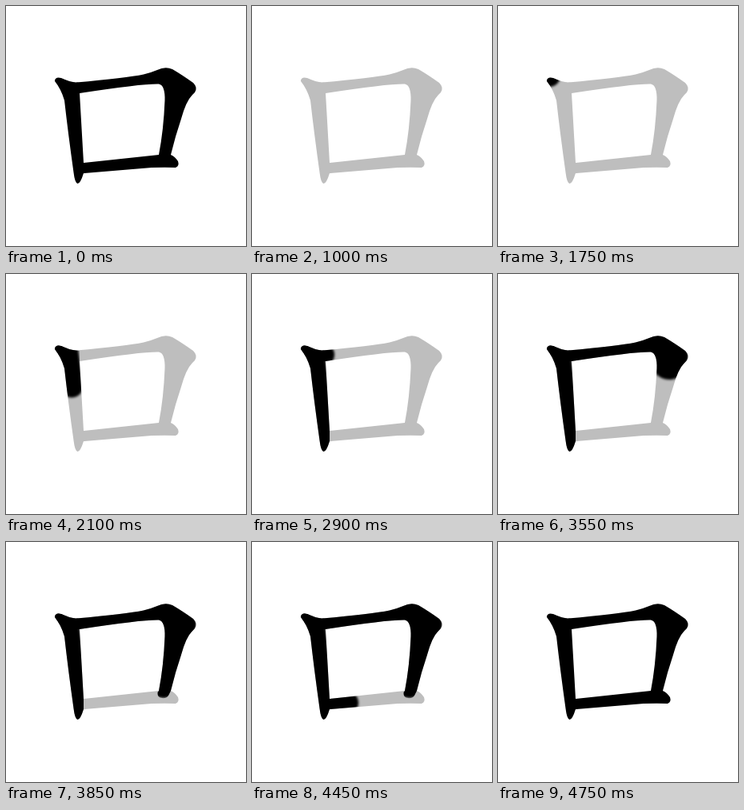
Recreate the animation shown at these times as an HTML page with a canvas. Size 300x300 px, loop 5.75 s.

```html
<!DOCTYPE html>
<html lang="en">
<head>
<meta charset="utf-8">
<title>Stroke order</title>
<style>
html, body { margin: 0; width: 100%; height: 100%; overflow: hidden; background: #fff; }
canvas { display: block; }
</style>
</head>
<body>
<canvas id="stage" width="300" height="300"></canvas>
<script>
const LOOP = 5750, STEP = 100, SHOW_GRAY = 1000, SHOW_FULL = 4750;
const ctx = document.getElementById('stage').getContext('2d');

const left = new Path2D('M61 93Q62 88 69 90Q80 95 88 95.5L92 96V109L97 196V209Q93 222 89.5 222Q86 221 84.5 208Q77.5 158 73 118Q69 104 61 94Z');
const corner = new Path2D('M88 95.5Q150 90 172 85.5Q182 83 189 80Q199 75 208 79Q220 86 234 96Q240 102 236 108L233 111Q225 119 219 141Q211.5 163 206 186L203 192Q200 196 195 195Q189 195 189.5 188L191 186Q197 155 198.5 118Q199 99 191 97.5Q170 97 92 109H88Z');
const bottom = new Path2D('M95 196.3L191 186H206Q211 188 215 194Q217 200 212 202Q200 201.5 182 202L95 209.3Z');
const shapes = [left, corner, bottom];

// A brush advances along its path by equal lengths, one per step.
const brushes = [
  { shape: left, width: 28, start: 1750, steps: 1, path: [[64, 87], [65, 87]] },
  { shape: left, width: 28, start: 1900, steps: 6, path: [[76, 94], [82, 138], [90, 210]] },
  { shape: corner, width: 28, start: 2900, steps: 6, path: [[89, 101], [204, 88], [224, 102]] },
  { shape: corner, width: 44, start: 3550, steps: 4, path: [[214, 110], [197, 173]] },
  { shape: bottom, width: 28, start: 4350, steps: 5, path: [[91, 203], [203, 195]] }
];

function pathLength(path) {
  return path.slice(1).reduce((sum, [x, y], i) =>
    sum + Math.hypot(x - path[i][0], y - path[i][1]), 0);
}

function fillAll(color) {
  ctx.fillStyle = color;
  shapes.forEach(s => ctx.fill(s));
}

function paint({ shape, width, start, steps, path }, t) {
  if (t < start) return;
  const step = Math.min(steps - 1, Math.floor((t - start) / STEP));
  const drawn = pathLength(path) * step / Math.max(1, steps - 1);
  ctx.save();
  ctx.clip(shape);
  ctx.filter = 'blur(1.8px)';
  ctx.lineWidth = width;
  ctx.lineCap = ctx.lineJoin = 'round';
  ctx.setLineDash([drawn + 0.1, 999]);
  ctx.beginPath();
  path.forEach(p => ctx.lineTo(...p));
  ctx.stroke();
  ctx.restore();
}

function draw(t) {
  ctx.clearRect(0, 0, 300, 300);
  if (t < SHOW_GRAY || t >= SHOW_FULL) {
    fillAll('#000');
  } else {
    fillAll('#bebebe');
    brushes.forEach(b => paint(b, t));
  }
}

const begin = performance.now();
function tick() {
  draw((performance.now() - begin) % LOOP);
  requestAnimationFrame(tick);
}
tick();
</script>
</body>
</html>
```
